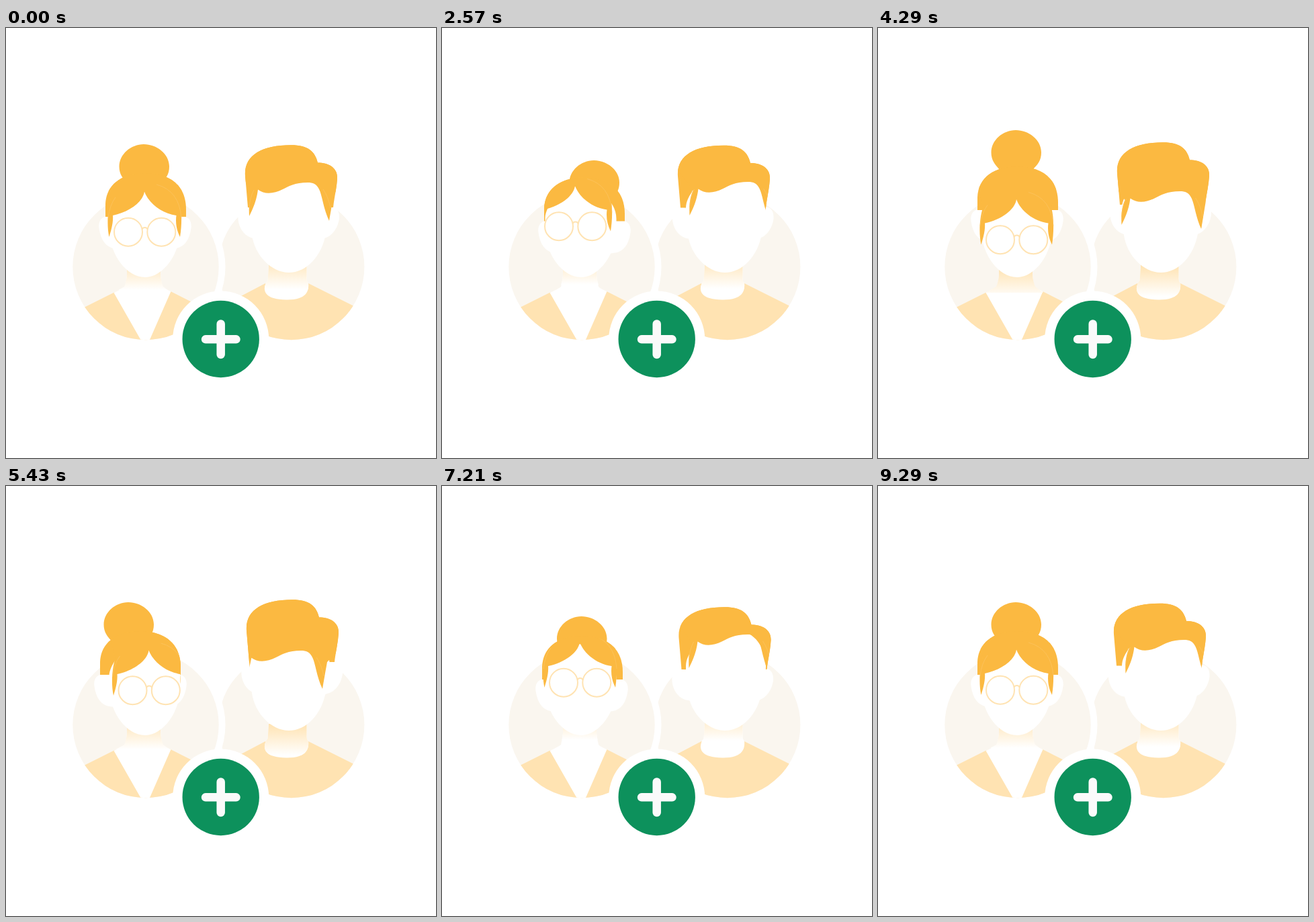
An HTML page without scripts that plays this animation: 640 px wide and 640 px high, repeating every 9370 ms.

```html
<!DOCTYPE html>
<html lang="en">
<head>
<meta charset="utf-8">
<title>Add people</title>
<style>
  html, body { margin: 0; width: 100%; height: 100%; overflow: hidden; background: #fff; }
  svg { display: block; width: 100vw; height: 100vh; }

  .disc { fill: #faf6ef; }
  .cloth { fill: #ffe3b2; }
  .skin { fill: #fff; }
  .hair { fill: #fbb941; }
  .seam { fill: none; stroke: #fcc768; stroke-width: .6; }
  .glasses { fill: none; stroke: #ffe3b2; stroke-width: 2; }

  .move { animation: 9370ms ease-in-out infinite; }
  .w-bun { animation-name: w-bun; }
  .w-cap { animation-name: w-cap; }
  .w-ears { animation-name: w-ears; }
  .w-fringe { animation-name: w-fringe; }
  .w-glasses { animation-name: w-glasses; }
  .w-shade { animation-name: w-shade; }
  .m-cap { animation-name: m-cap; }
  .m-ears { animation-name: m-ears; }
  .m-fringe { animation-name: m-fringe; }
  .m-shade { animation-name: m-shade; }

  /* Woman: right, left and up, down, right, up, centre */
  @keyframes w-bun {
    0%, 98.5%, 100% { translate: 0 0; }
    11%, 18% { translate: -31px 0; }
    27%, 33% { translate: 21px 24px; }
    43%, 48% { translate: 0 -21px; }
    58% { translate: -23px 0; }
    65% { translate: -29px 0; }
    75%, 80% { translate: 2.5px 21px; }
  }
  @keyframes w-cap {
    0%, 98.5%, 100% { translate: 0 0; }
    11%, 18% { translate: -8px 0; }
    27%, 33% { translate: 4px 6.5px; }
    43%, 48% { translate: 0 -10px; }
    58%, 65% { translate: -8px 0; }
    75%, 80% { translate: 1px 7px; }
  }
  @keyframes w-ears {
    0%, 98.5%, 100% { translate: 0 0; }
    11% { translate: -6px 0; }
    15%, 18% { translate: -4px 0; }
    27%, 33% { translate: 5px 6.5px; }
    43%, 48% { translate: 0 -10.5px; }
    58%, 65% { translate: -7px 0; }
    75%, 80% { translate: 1px 7px; }
  }
  /* Fringes move relative to the cap that clips them */
  @keyframes w-fringe {
    0%, 98.5%, 100% { translate: 0 0; }
    11%, 18% { translate: 13.5px 0; }
    27%, 33% { translate: -12px -15px; }
    43%, 48% { translate: 0 21.5px; }
    58%, 65% { translate: 14.5px 1px; }
    75%, 80% { translate: -2px -18px; }
  }
  @keyframes w-glasses {
    0%, 98.5%, 100% { translate: 0 0; }
    11%, 18% { translate: 5.5px 0; }
    27%, 33% { translate: -8px -8.5px; }
    43%, 48% { translate: 0 11.5px; }
    58%, 65% { translate: 6.5px .5px; }
    75%, 80% { translate: -1px -11px; }
  }
  @keyframes w-shade {
    0%, 98.5%, 100% { translate: 0 0; }
    11%, 18% { translate: 0 1px; }
    27%, 33% { translate: 0 -8px; }
    43%, 48% { translate: 0 12px; }
    58%, 65% { translate: 0 2px; }
    75%, 80% { translate: 0 -12px; }
  }

  /* Man: right, left, down, down right, up left, right, left */
  @keyframes m-cap {
    0% { translate: 0 0; }
    10%, 15.3%, 85.5%, 88% { translate: 3px 0; }
    23%, 33%, 98.5%, 100% { translate: -5px .5px; }
    43%, 50% { translate: 0 -4px; }
    58%, 65.5% { translate: 2px -5px; }
    75%, 78% { translate: -3.5px 6px; }
  }
  @keyframes m-ears {
    0% { translate: 0 0; }
    10%, 15.3%, 85.5%, 88% { translate: 5.5px 1px; }
    23%, 33%, 98.5%, 100% { translate: -2.5px .5px; }
    43%, 50% { translate: 0 -5.5px; }
    58%, 65.5% { translate: 5px -4px; }
    75%, 78% { translate: -3px 6px; }
  }
  @keyframes m-fringe {
    0% { translate: 0 0; }
    10%, 15.3%, 85.5%, 88% { translate: -6px 0; }
    23%, 33%, 98.5%, 100% { translate: 11.5px -1.5px; }
    43%, 50% { translate: .5px 17px; }
    58%, 65.5% { translate: -12px 20px; }
    75%, 78% { translate: 9px -15px; }
  }
  @keyframes m-shade {
    0% { translate: 0 0; }
    10%, 15.3%, 85.5%, 88% { translate: 0 0; }
    23%, 33%, 98.5%, 100% { translate: 0 -1px; }
    43%, 50% { translate: 0 11px; }
    58%, 65.5% { translate: 0 12px; }
    75%, 78% { translate: 0 -10px; }
  }
</style>
</head>
<body>
<svg viewBox="0 0 640 640">
  <defs>
    <linearGradient id="shade" x1="0" y1="0" x2="0" y2="1">
      <stop offset="0" stop-color="#ffe3b2"/>
      <stop offset="1" stop-color="#fff"/>
    </linearGradient>
    <clipPath id="w-disc"><circle cx="208" cy="355.5" r="108.7"/></clipPath>
    <clipPath id="m-disc"><circle cx="424.7" cy="355.5" r="108.7"/></clipPath>
    <clipPath id="w-neck"><path d="M180 340V368Q179 378 176 385H234Q231 378 230 368V340Z M176 385L160 394H246L234 385Z"/></clipPath>
    <clipPath id="m-neck"><path id="m-neck-shape" d="M391 340V355L389.500 376Q386 380 386 382C383 390 384 404.500 418 404.500C448 404.500 451 391 450 380Q447.500 377 447.500 374V340Z"/></clipPath>
    <clipPath id="w-clip"><path d="M148 345V262C149 232 174 216 207 216C241 216 268 232 268 270V345Z"/></clipPath>
    <clipPath id="m-clip"><path d="M363 310L360 267L356 220C354 190 380 174.300 424 174.300C450 174.300 460 184 464 200.500C480 200.500 494 208 493 224C492 240 488 255 487 267L480 310Z"/></clipPath>
  </defs>

  <circle class="disc" cx="424.700" cy="355.500" r="108.700"/>
  <circle class="skin" cx="208" cy="355.500" r="118.500"/>
  <circle class="disc" cx="208" cy="355.500" r="108.700"/>

  <g id="man">
    <g clip-path="url(#m-disc)">
      <path class="cloth" d="M310 420L386 380H450L540 425V470H310Z"/>
      <use href="#m-neck-shape" class="skin"/>
    </g>
    <g clip-path="url(#m-neck)">
      <rect class="move m-shade" x="380" y="342" width="76" height="47" fill="url(#shade)"/>
    </g>
    <g class="skin move m-ears">
      <path d="M364 268C352 263 344 272 345.500 285C347 300 357 312 370 313L390 320V268Z"/>
      <path d="M477 268C489 262 497 270 496 283C494 299 484 311 473 313L452 322V268Z"/>
    </g>
    <path class="hair move m-cap" d="M360 267L356 220C354 190 380 174.300 424 174.300C450 174.300 460 184 464 200.500C480 200.500 494 208 493 224C492 240 488 255 487 267Z"/>
    <path class="skin" d="M363 290V268C363 258 368 250 372 244C380 222 400 212 425 212C455 212 480 228 482 268C482 285 479 296 476 306C470 340 447 364 421 364C395 364 370 338 366 308Z"/>
    <g class="move m-cap" clip-path="url(#m-clip)">
      <g class="move m-fringe">
        <path class="hair" d="M362 280C361 262 363 252 367 243L335 200V140H520V215L488 247C486 258 483 275 481 287C472 268 471 250 466 240C462 232 457 230 449 230C430 230 420 236 412 240C398 247 385 248 375 240.500C373 258 366 272 362 280Z"/>
        <path class="seam" d="M362 268Q363 252 369 241M472 240Q480 252 483 268"/>
      </g>
    </g>
  </g>

  <g id="woman">
    <path class="hair move w-bun" d="M205 173C224 173 243 187 243 206C243 218 238 224 230 232H181C174 224 168.500 218 168.500 206C168.500 188 186 173 205 173Z"/>
    <g clip-path="url(#w-disc)">
      <path class="cloth" d="M90 429L160 394L207 380L245 392L310 425V470H90Z"/>
      <path class="skin" d="M180 340V368Q179 378 177 385Q174 388 160.500 394L201 465H213.500L245.500 392Q235 388 233 385Q231 378 230 368V340Z"/>
    </g>
    <g clip-path="url(#w-neck)">
      <rect class="move w-shade" x="155" y="345" width="96" height="45" fill="url(#shade)"/>
    </g>
    <g class="skin move w-ears">
      <path d="M153 281C142 279 137 288 138.500 298C141 316 149 326 161 328L175 330V281Z"/>
      <path d="M261 281C272 279 277 288 275.500 298C273 316 265 326 253 328L239 330V281Z"/>
    </g>
    <path class="hair move w-cap" d="M148 281V262C149 232 174 216 207 216C241 216 268 232 268 270V281Z"/>
    <path class="skin" d="M153.500 300V282C154 272 162 258 172 248C183 231 229 231 241 248C252 258 259.500 270 259.500 284V300C258 340 232 371 207 371C180 371 154.500 338 153.500 300Z"/>
    <g class="move w-cap" clip-path="url(#w-clip)">
      <g class="move w-fringe">
        <path class="hair" d="M153.500 311C150 295 151 272 156 256L140 190H276L258 256C262 270 262 292 259 311C254 301 252 291 253.500 279C231 276 212 260 206 243.500C204 259 183 274 159 279C160 290 156 303 153.500 311Z"/>
        <path class="seam" d="M152 283Q154 264 163 252M224 233Q258 242 261 283"/>
      </g>
    </g>
    <g class="glasses move w-glasses">
      <circle cx="182" cy="303.700" r="21"/>
      <circle cx="231.300" cy="303.700" r="21"/>
      <path d="M202.500 300Q203 297 206.600 297T210.700 300"/>
    </g>
  </g>

  <g id="add">
    <circle class="skin" cx="319.700" cy="463" r="71.500"/>
    <circle cx="319.700" cy="463" r="57.200" fill="#0d915c"/>
    <path d="M297 463.300H342.500M319.700 440.500V486" stroke="#fafafa" stroke-width="12.500" stroke-linecap="round"/>
  </g>
</svg>
</body>
</html>
```
